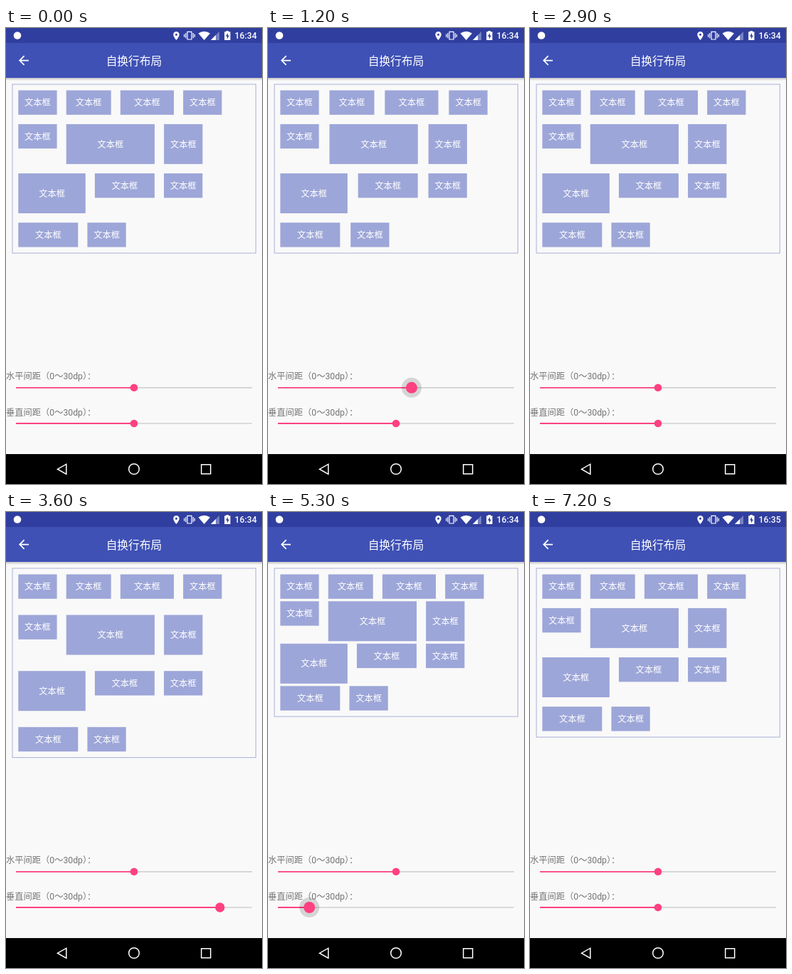
Recreate the animation shown at these times as an HTML page. Size 360 by 640 pixels, loop 7300 ms.

```html
<!DOCTYPE html>
<html lang="zh-CN">
<head>
<meta charset="utf-8">
<style>
  html, body { margin: 0; width: 100%; height: 100%; overflow: hidden; background: #f9f9f9; }
  svg { display: block; width: 360px; height: 640px; }
  text { font: 12.25px Roboto, "Noto Sans CJK SC", "Noto Sans CJK", sans-serif; fill: #fff; }
  .mid { text-anchor: middle; }
  .label { fill: #747474; }
  .line { fill: none; stroke: #fff; stroke-width: 1.5; }
</style>
</head>
<body>
<svg id="stage" viewBox="0 0 360 640">
  <defs>
    <linearGradient id="shade" x2="0" y2="1">
      <stop stop-opacity=".22"/><stop offset="1" stop-opacity="0"/>
    </linearGradient>
  </defs>
  <rect width="360" height="640" fill="#f9f9f9"/>
  <rect y="70" width="360" height="4" fill="url(#shade)"/>
  <rect width="360" height="70" fill="#3f51b5"/>
  <rect width="360" height="21" fill="#303f9f"/>

  <g fill="#fff">
    <circle cx="16" cy="10.5" r="5.3"/>
    <path transform="translate(232.3 3.8) scale(.6)" fill-rule="evenodd" d="M12 2C8.1 2 5 5.1 5 9c0 5.2 7 13 7 13s7-7.8 7-13c0-3.9-3.1-7-7-7zM12 6.5a2.5 2.5 0 1 1 0 5a2.5 2.5 0 1 1 0-5z"/>
    <path d="M270.5 7.6Q278.700 1.800 287 7.600L278.700 17z"/>
    <path d="M300 5V17H288z" opacity=".35"/>
    <path d="M295 10V17H288z"/>
    <path fill-rule="evenodd" d="M309.500 5.300V4H313V5.300H315.500V17H307.200V5.300zM312 7L309 11.800H310.900V15.500L314 10.500H312z"/>
    <path transform="translate(14.500 35) scale(.875)" d="M20 11H7.830l5.590-5.590L12 4l-8 8 8 8 1.410-1.410L7.830 13H20z"/>
  </g>
  <path class="line" style="stroke-width:1.2" d="M255 5.300H261V16H255zM252.800 7V14.300M263.200 7V14.300M250.700 8.700V12.700M265.300 8.700V12.700"/>
  <text id="clock" x="321.500" y="15" font-weight="500" style="font-weight:500"></text>
  <text class="mid" x="180" y="52" style="font-size:15.750px">自换行布局</text>

  <rect id="frame" x="9" y="79" width="342.300" fill="none" stroke="#a9b0da"/>
  <g id="boxes"></g>
  <text class="label" x="0" y="493.300">水平间距（0～30dp）：</text>
  <text class="label" x="0" y="543.500">垂直间距（0～30dp）：</text>
  <g id="sliders"></g>

  <rect y="598" width="360" height="42"/>
  <path class="line" d="M84.800 612.200V626.200L72.500 619.200zM274.700 612.700H287.700V625.700H274.700z"/>
  <circle class="line" cx="180" cy="619" r="7.300"/>
</svg>
<script>
const LOOP = 7300, STEP = 100;
const LEFT = 17.3, TOP = 87.5, INNER = 326, MAX_GAP = 26.25;
const LOW = 34.3, HIGH = 56;
const sizes = [
  [54.3, LOW], [63, LOW], [75.2, LOW], [54.3, LOW], [54.3, LOW], [124.3, HIGH],
  [54.3, HIGH], [94.5, HIGH], [84, LOW], [54.3, LOW], [84, LOW], [54.3, LOW]
];
const $ = id => document.getElementById(id);

function add(parent, tag, attrs) {
  const node = document.createElementNS("http://www.w3.org/2000/svg", tag);
  set(node, attrs);
  return parent.appendChild(node);
}
function set(node, attrs) {
  for (const key in attrs) node.setAttribute(key, attrs[key]);
}

const boxes = sizes.map(([w, h]) => {
  const box = add($("boxes"), "g", {});
  add(box, "rect", { width: w, height: h, fill: "#9da6d8" });
  add(box, "text", { class: "mid", x: w / 2, y: h / 2 + 4.6 }).textContent = "文本框";
  return box;
});

// keys are [time, value] pairs; press and release are times
function slider(y, press, release, keys) {
  const parent = $("sliders");
  add(parent, "path", { d: `M14 ${y}H346`, stroke: "#d2d2d2", "stroke-width": 1.7 });
  const fill = add(parent, "path", { stroke: "#ff4081", "stroke-width": 1.8 });
  const halo = add(parent, "circle", { cy: y, r: 14 });
  const thumb = add(parent, "circle", { cy: y, fill: "#ff4081" });
  return t => {
    const value = track(keys, t), x = 14 + 332 * value;
    const grow = ramp(t, press, 200) - ramp(t, release, 200);
    const glow = ramp(t, press + 100, 200) - ramp(t, release, 400);
    set(fill, { d: `M14 ${y}H${x}` });
    set(halo, { cx: x, "fill-opacity": 0.14 * glow });
    set(thumb, { cx: x, r: 5.3 + 2.7 * grow });
    return value * MAX_GAP;
  };
}

const ramp = (t, start, length) => Math.min(1, Math.max(0, (t - start) / length));

function track(keys, t) {
  const i = keys.findIndex(key => key[0] > t);
  if (i < 0) return keys[keys.length - 1][1];
  if (i === 0) return keys[0][1];
  const [t0, a] = keys[i - 1], [t1, b] = keys[i];
  return a + (b - a) * (t - t0) / (t1 - t0);
}

const horizontal = slider(504.8, 200, 2300, [
  [300, .5], [700, 1], [900, 1], [1200, .566], [1550, 0], [1700, 0], [2000, .4], [2200, .5]
]);
const vertical = slider(555, 3500, 6500, [
  [3500, .5], [3600, .864], [4000, .95], [4300, 1], [4600, 1], [4800, .9],
  [5300, .133], [5450, 0], [5550, 0], [5600, .05], [6000, .4], [6250, .5]
]);

function layout(gapX, gapY) {
  let x = 0, y = TOP, rowHeight = 0;
  sizes.forEach(([w, h], i) => {
    if (x + w > INNER) {
      x = 0;
      y += rowHeight + gapY;
      rowHeight = 0;
    }
    set(boxes[i], { transform: `translate(${LEFT + x} ${y})` });
    x += w + gapX;
    rowHeight = Math.max(rowHeight, h);
  });
  set($("frame"), { height: y + rowHeight + 8.5 - 79 });
}

function draw() {
  const t = Math.floor(performance.now() % LOOP / STEP) * STEP;
  layout(horizontal(t), vertical(t));
  $("clock").textContent = t < 5500 ? "16:34" : "16:35";
  requestAnimationFrame(draw);
}
draw();
</script>
</body>
</html>
```
